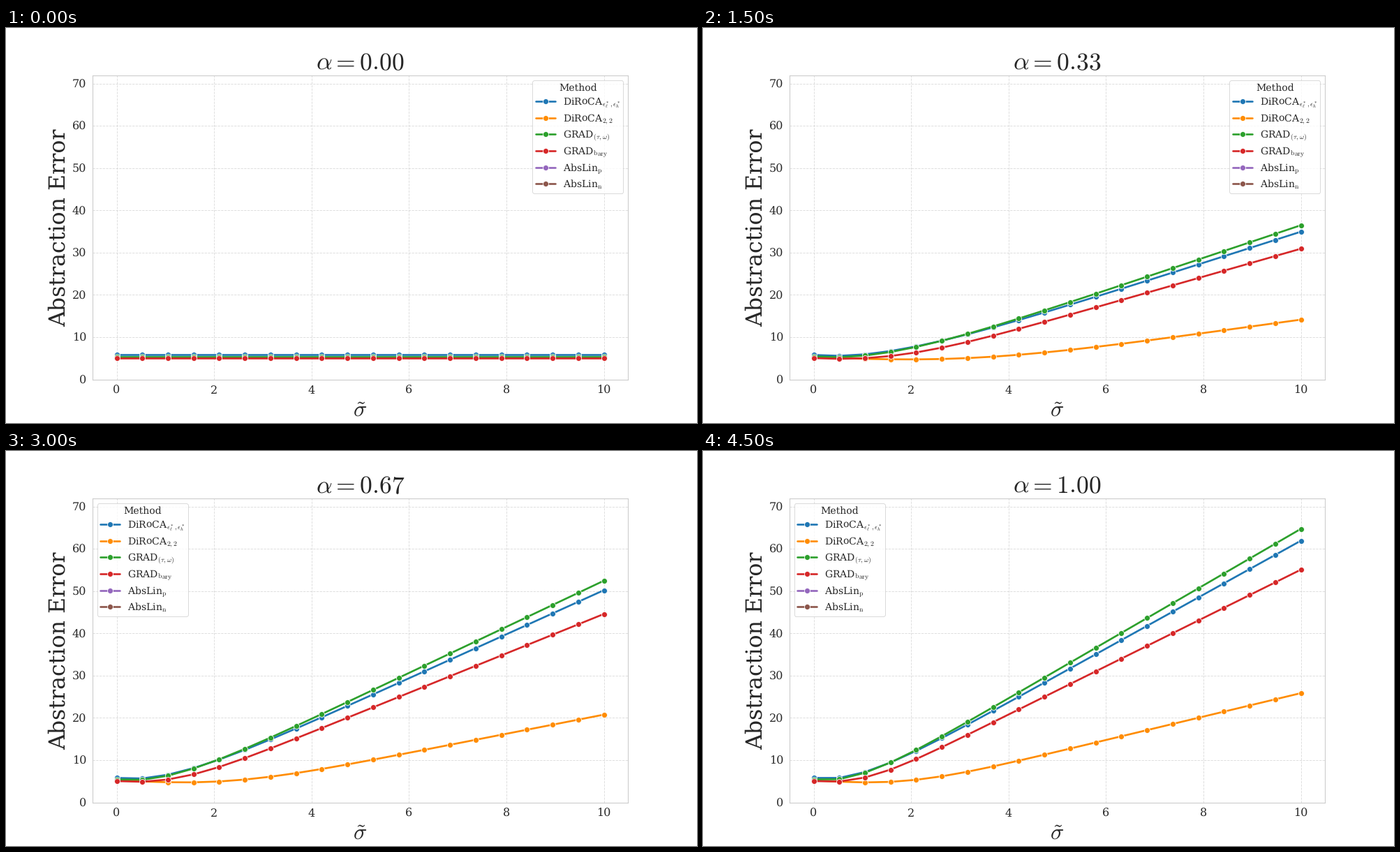
A matplotlib script that plays this animation: 990x566 px, repeating every 5000 ms.

```python
import numpy as np
import matplotlib.pyplot as plt
from matplotlib.animation import FuncAnimation

W, H, DPI = 990, 566, 64
FRAMES, INTERVAL = 10, 500
INK, EDGE = "0.15", "0.8"

plt.rcParams.update({
    "font.family": "DejaVu Serif",
    "mathtext.fontset": "cm",
    "text.hinting": "none",
    "text.color": INK,
    "axes.labelcolor": INK,
    "xtick.color": INK,
    "ytick.color": INK,
    "axes.edgecolor": EDGE,
    "axes.linewidth": 1.25,
    "axes.axisbelow": True,
    "lines.solid_capstyle": "round",
})


def error(s, start, slope, offset, decay, bend):
    """Straight line that the curve reaches as its initial excess dies out."""
    excess = (start - offset) * np.exp(-s * (decay + bend * s))
    return slope * s + offset + excess


# Label, colour and curve parameters; the last two stay off the plot
METHODS = [
    (r"DiRoCA$_{\epsilon_\ell^*, \epsilon_h^*}$", "#1f77b4", (5.8, 6.38, -1.9, 1.06, 0.05)),
    (r"DiRoCA$_{2, 2}$", "#ff8c00", (5.2, 2.77, -1.85, 0.46, 0.15)),
    (r"GRAD$_{(\tau, \omega)}$", "#2ca02c", (5.45, 6.68, -2.1, 1.12, 0.1)),
    (r"GRAD$_{\mathrm{bary}}$", "#d62728", (5.05, 5.71, -2.05, 0.95, 0.27)),
    (r"AbsLin$_{\mathrm{p}}$", "#9467bd", None),
    (r"AbsLin$_{\mathrm{n}}$", "#8c564b", None),
]
SIGMA = np.linspace(0, 10, 20)

fig = plt.figure(figsize=(W / DPI, H / DPI), dpi=DPI, facecolor="white")
left, right, top, bottom = 123.6, 891.4, 68, 503.6
ax = fig.add_axes([left / W, 1 - bottom / H, (right - left) / W, (bottom - top) / H])
ax.set_xlim(-0.5, 10.5)
ax.set_ylim(0, 71.9)
ax.set_xticks(range(0, 11, 2))
ax.set_yticks(range(0, 71, 10))
ax.tick_params(length=0, labelsize=18, pad=9.5)
ax.grid(True, color=EDGE, linestyle="--", linewidth=1, alpha=0.7)
ax.set_xlabel(r"$\tilde{\sigma}$", fontsize=36, labelpad=5)
ax.set_ylabel("Abstraction Error", fontsize=35.6)
title = ax.set_title("", fontsize=40, pad=4.5)

lines = [
    ax.plot([], [], color=color, label=label, linewidth=3, marker="o",
            markersize=9, markeredgecolor="white", markeredgewidth=0.9)[0]
    for label, color, _ in METHODS
]


def make_legend(loc):
    return ax.legend(handles=lines, loc=loc, title="Method", fontsize=15.7,
                     title_fontsize=15.7, borderpad=0.32, labelspacing=0.33)


legend_right = make_legend("upper right")
legend_left = make_legend("upper left")
ax.add_artist(legend_right)


def update(frame):
    alpha = frame / (FRAMES - 1)
    title.set_text(rf"$\alpha = {alpha:.2f}$")
    for line, (_, _, params) in zip(lines, METHODS):
        if params:
            line.set_data(SIGMA, error(SIGMA * np.sqrt(alpha), *params))
    # The legend moves out of the way of the rising curves
    legend_right.set_visible(alpha < 0.5)
    legend_left.set_visible(alpha > 0.5)
    return lines


anim = FuncAnimation(fig, update, frames=FRAMES, interval=INTERVAL,
                     init_func=lambda: update(0), repeat=True, repeat_delay=0)
plt.show()
```
